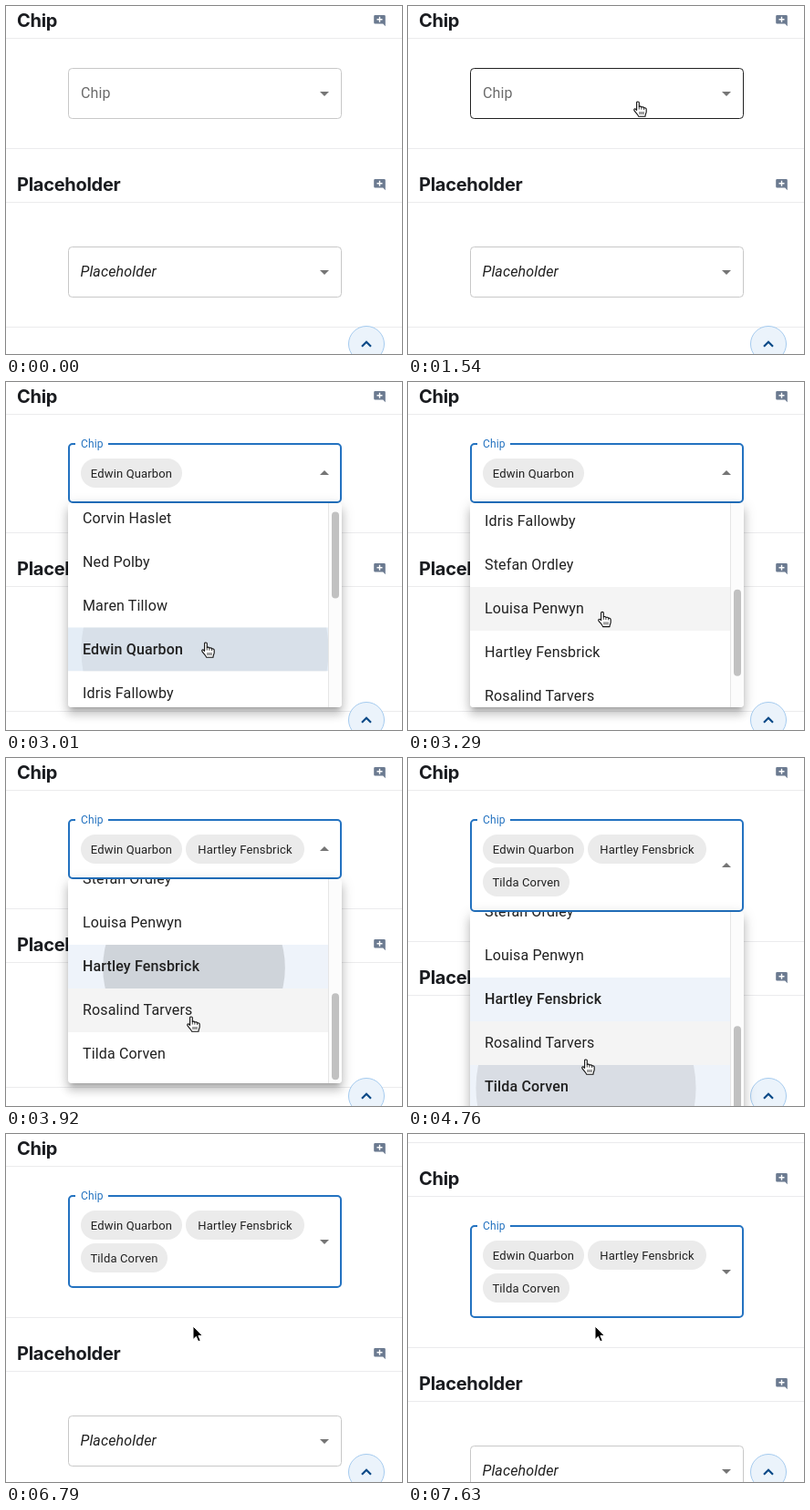
Recreate the animation shown at these times as an HTML page. Size 434 by 382 pixels, loop 8000 ms.

```html
<!DOCTYPE html>
<html lang="en">
<head>
<meta charset="utf-8">
<style>
  html, body { margin: 0; width: 100%; height: 100%; overflow: hidden; background: #fff; }
  svg { display: block; }
  text { font: 16px Roboto, sans-serif; letter-spacing: .15px; fill: #212121; white-space: pre; }
  .head { font: 700 20px Inter, sans-serif; letter-spacing: -.28px; fill: #1a1c20; }
  .chip { font-size: 13px; text-anchor: middle; }
  .paper {
    height: 224px; border-radius: 4px; background: #fff;
    box-shadow: 0 5px 5px -3px rgba(0,0,0,.2), 0 8px 10px 1px rgba(0,0,0,.14), 0 3px 14px 2px rgba(0,0,0,.12);
  }
</style>
</head>
<body>
<svg id="stage" width="434" height="382" viewBox="0 0 434 382">
  <defs>
    <g id="note">
      <path d="M404.5 10h10q1.3 0 1.3 1.3v10.9l-2.6-2.6h-8.7q-1.3 0-1.3-1.3v-7q0-1.3 1.3-1.3z" fill="#6b7a90"/>
      <path d="M409.5 11.8v6M406.5 14.8h6" stroke="#fff" stroke-width="1.4"/>
    </g>
    <clipPath id="clip"><rect width="300" height="224" rx="4"/></clipPath>
  </defs>
  <g id="page">
    <path d="M0 9.5H434M0 35.5H434" stroke="#ebebed" id="rules"/>
    <text class="head" x="12" y="23">Chip</text>
    <use href="#note"/>
    <rect id="field" rx="4" fill="#fff"/>
    <rect id="notch" x="76" y="66" height="6" fill="#fff"/>
    <text id="label" x="82">Chip</text>
    <path id="caret" fill="#757575"/>
    <g id="chips"></g>
    <g id="below">
      <path d="M0 156.5H434M0 215.5H434M0 352.5H434" stroke="#ebebed"/>
      <text class="head" x="12" y="203">Placeholder</text>
      <use href="#note" y="180"/>
      <rect x="68.5" y="264.5" width="299" height="55" rx="4" fill="#fff" stroke="#c8c8c8"/>
      <text x="81.5" y="297" style="font-style:italic">Placeholder</text>
      <path d="M344 290h10l-5 5z" fill="#757575"/>
    </g>
  </g>
  <circle cx="395" cy="371" r="19.5" fill="#ebf3fb" stroke="#a5cbef"/>
  <path d="M390 373.8l5-5 5 5" fill="none" stroke="#0b4a88" stroke-width="2.2"/>
  <g id="menu">
    <foreignObject width="300" height="224" style="overflow:visible"><div class="paper"></div></foreignObject>
    <g clip-path="url(#clip)">
      <g id="list"></g>
      <rect x="285" width="15" height="224" fill="#fcfcfc"/>
      <path d="M285.5 0V224" stroke="#e6e6e6"/>
      <rect id="thumb" x="289" width="8" height="95" rx="4" fill="#c1c1c1"/>
    </g>
  </g>
  <path id="arrow" d="M0 0V14.6L3.4 11.4 5.7 16.8 8.2 15.7 5.9 10.4H10.4Z" stroke="#fff" stroke-width="1"/>
  <g id="hand" stroke="#111" stroke-width="1.1" stroke-linejoin="round">
    <path fill="#fff" d="M-1.4 1.6C-1.4.1 1.3.1 1.3 1.6V6C2 5.3 3.7 5.6 3.9 6.6 4.8 6 6.4 6.3 6.6 7.4 7.6 7 9.2 7.5 9.2 9V11.6C9.2 13.2 8 14.2 8 16.7H.6C.1 14.6-2.4 12.6-3.8 10.7-5.1 8.9-3.5 7.6-2.3 8.8L-1.4 9.8Z"/>
    <path fill="none" d="M1.3 6V9M3.9 6.6V9.2M6.6 7.4V9.5M2 11.5V14.5M4 11.5V14.5M6 11.5V14.5" stroke-width=".8"/>
  </g>
</svg>
<script>
const LOOP = 8000, STEP = 70, ROW = 48, BLUE = '#2372c0';
const people = ['Corvin Haslet', 'Ned Polby', 'Maren Tillow', 'Edwin Quarbon', 'Idris Fallowby',
  'Stefan Ordley', 'Louisa Penwyn', 'Hartley Fensbrick', 'Rosalind Tarvers', 'Tilda Corven'];

// row, press time, time the chip shows, press x, chip x, y, width
const picks = [
  { row: 3, press: 2660, at: 2800, px: 150, x: 82, y: 84, w: 111 },
  { row: 7, press: 3710, at: 3850, px: 138, x: 197, y: 84, w: 130 },
  { row: 9, press: 4480, at: 4620, px: 127, x: 82, y: 120, w: 95 }
];
const path = [[420, 262, 251], [560, 255, 190], [700, 246, 115], [770, 242, 76], [980, 252, 105],
  [2100, 252, 105], [2240, 243, 160], [2450, 219, 286], [3080, 219, 286], [3430, 209, 230], [3570, 206, 231],
  [3780, 206, 231], [3920, 203, 284], [4340, 195, 331], [5040, 195, 331], [5250, 92, 268],
  [5460, 92, 268], [5810, 24, 117], [6090, 41.5, 184], [6300, 41.5, 184], [6790, 205, 211]];
const listScroll = [[2940, 0], [3010, 15.5], [3220, 170], [3430, 272]];
const pageScroll = [[7350, 0], [7490, 14], [7630, 33]];

const $ = id => document.getElementById(id);
const clamp = v => Math.min(1, Math.max(0, v));
const mix = (a, b, p) => a + (b - a) * p;
const span = (t, a, b) => clamp((t - a) / (b - a));
const out = p => 1 - (1 - p) ** 2.25;

function set(el, attrs) {
  for (const k in attrs) el.setAttribute(k, attrs[k]);
  return el;
}
function make(parent, tag, attrs, text) {
  const el = set(document.createElementNS('http://www.w3.org/2000/svg', tag), attrs);
  if (text) el.textContent = text;
  return parent.appendChild(el);
}
const show = (el, on) => set(el, { visibility: on ? 'visible' : 'hidden' });

function track(keys, t) {
  const i = keys.findIndex(k => k[0] > t);
  if (i === 0) return keys[0].slice(1);
  if (i < 0) return keys[keys.length - 1].slice(1);
  const a = keys[i - 1], b = keys[i], p = span(t, a[0], b[0]);
  return a.slice(1).map((v, j) => mix(v, b[j + 1], p));
}

set($('rules'), { d: 'M0 -23.5H434M0 35.5H434' });
const list = $('list');
const rows = people.map((_, i) => make(list, 'rect', { y: 8 + i * ROW, width: 285, height: ROW }));
const wave = make(list, 'svg', { width: 285, height: ROW, overflow: 'hidden' });
const ripple = make(wave, 'circle', { cy: 25 });
const names = people.map((n, i) => make(list, 'text', { x: 16, y: 37 + i * ROW }, n));
for (const p of picks) {
  p.el = make($('chips'), 'g', {});
  make(p.el, 'rect', { x: p.x, y: p.y, width: p.w, height: 32, rx: 16, fill: '#ebebeb' });
  make(p.el, 'text', { class: 'chip', x: p.x + p.w / 2, y: p.y + 20.7 }, people[p.row]);
}

function draw(t) {
  const picked = picks.filter(p => t >= p.at);
  const h = [56, 65, 65, 101][picked.length];
  const focus = t >= 1610, open = t >= 1610 && t < 6440;
  const [x, y] = track(path, t);
  const [scroll] = track(listScroll, t);

  // page and field
  set($('page'), { transform: `translate(0 ${track(pageScroll, t)[0]})` });
  set($('below'), { transform: `translate(0 ${h - 56})` });
  const sw = focus ? 2 : 1;
  set($('field'), {
    x: 68 + sw / 2, y: focus ? 68 : 68.5, width: 300 - sw, height: h - 1, 'stroke-width': sw,
    stroke: focus ? BLUE : t >= 1330 ? '#212121' : '#c8c8c8'
  });
  const up = out(span(t, 1540, 1810));
  set($('notch'), { width: 36 * up });
  set($('label'), { y: mix(101.3, 72.3, up) });
  $('label').style.cssText = `font-size:${mix(16, 12, up)}px;fill:${focus ? BLUE : '#6b6b6b'}`;
  const cy = Math.floor(68 + h / 2);
  set($('caret'), { d: open ? `M344 ${cy + 2}h10l-5 -5z` : `M344 ${cy - 2}h10l-5 5z` });
  picks.forEach(p => show(p.el, t >= p.at));

  // menu
  const top = 68 + h;
  const grow = out(span(t, 1540, 1960)) * (1 - span(t, 6370, 6720));
  $('menu').style.display = grow > 0 && focus ? '' : 'none';
  set($('menu'), {
    opacity: grow,
    transform: `translate(218 ${top}) scale(${mix(.75, 1, grow)} ${mix(.5625, 1, grow)}) translate(-150 0)`
  });
  set(list, { transform: `translate(0 ${-scroll})` });
  set($('thumb'), { y: 2.5 + scroll * 224 / 496 });
  const inside = open && x >= 68 && x < 353 && y >= top;
  const hover = inside ? Math.floor((y - top + scroll - 8) / ROW) : -1;
  rows.forEach((r, i) => {
    const on = picked.some(p => p.row === i), over = i === hover;
    const first = i === 0 && !picked.length;
    set(r, { fill: on ? (over ? '#e4edf6' : '#eef3fa') : first ? '#e2e2e2' : over ? '#f4f4f4' : '#fff' });
    names[i].style.fontWeight = on ? 500 : 400;
  });
  const hit = picks.find(p => t >= p.press && t < p.press + 560);
  wave.style.display = hit ? '' : 'none';
  if (hit) {
    const age = t - hit.press;
    set(wave, { y: 8 + hit.row * ROW });
    set(ripple, { cx: hit.px, r: 151 * out(clamp(age / 550)), opacity: .13 * (1 - span(age, 210, 450)) });
  }

  // pointer
  const hand = t >= 1330 && t < 6000 && x >= 68;
  show($('hand'), hand);
  show($('arrow'), !hand && t >= 420);
  set(hand ? $('hand') : $('arrow'), { transform: `translate(${x} ${hand ? y - .5 : y})` });
}

const start = performance.now();
function frame() {
  const t = (performance.now() - start) % LOOP;
  draw(Math.floor(t / STEP) * STEP);
  requestAnimationFrame(frame);
}
frame();
</script>
</body>
</html>
```
